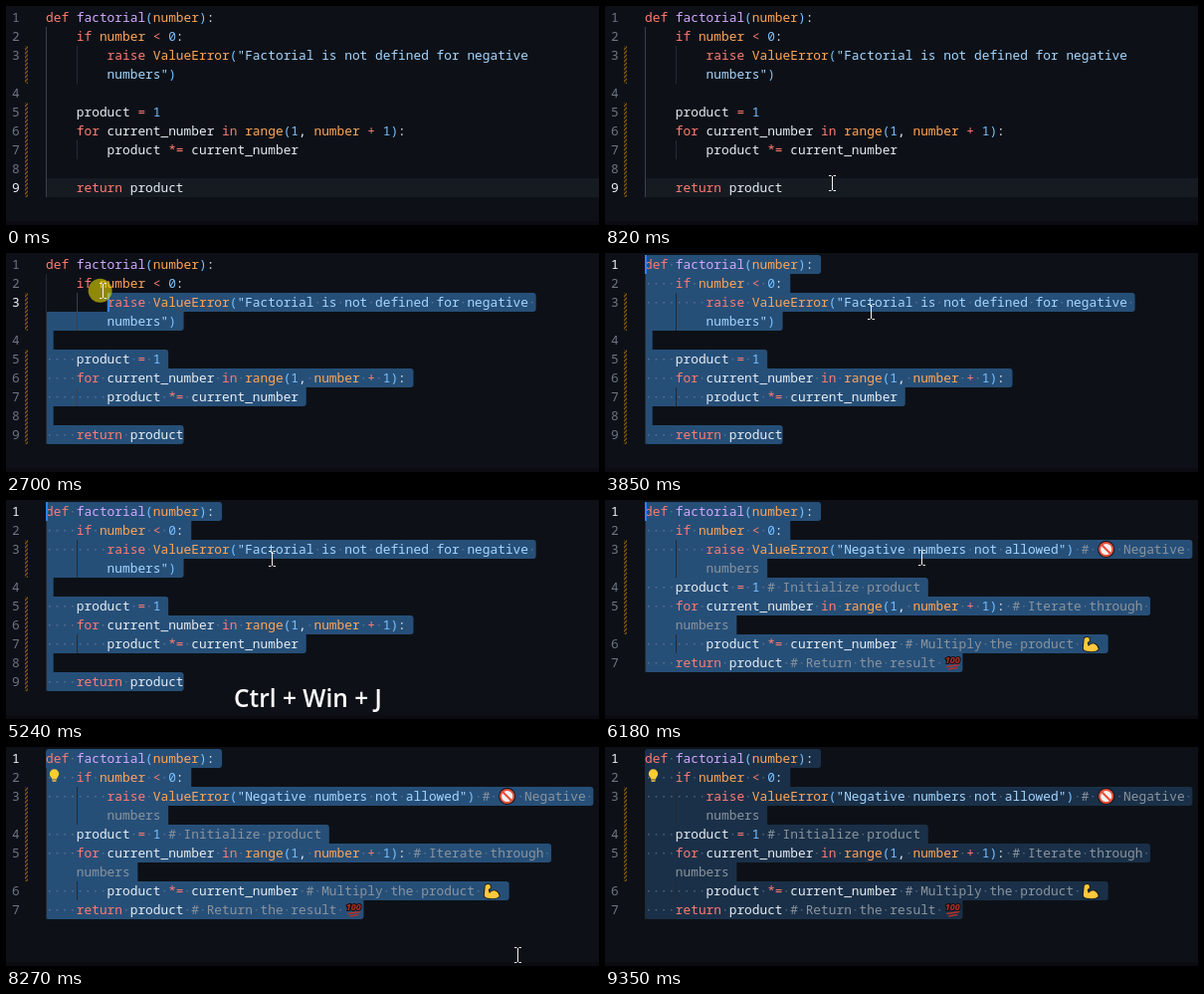
Write an HTML page with a canvas that moves like this. It is 596 px wide and 220 px high and loops after 9.42 s.

```html
<!DOCTYPE html>
<html>
<head>
<meta charset="utf-8">
<style>
  html, body { margin: 0; width: 596px; height: 220px; overflow: hidden; background: #0d1117; }
  canvas { display: block; }
</style>
</head>
<body>
<canvas id="stage" width="596" height="220"></canvas>
<script>
const g = document.getElementById('stage').getContext('2d');
const LOOP = 9420, LEFT = 40, TOP = 2, ROW = 19, CHAR = 7.698, EMOJI = 19.2;
const EDIT = 5980, PRESS = 2020, RELEASE = 2840, BLUR = 9350;

// Each row is [line number, text]; wrapped rows have no number.
const before = {
  rows: [
    [1, 'def factorial(number):'],
    [2, '    if number < 0:'],
    [3, '        raise ValueError("Factorial is not defined for negative '],
    [0, '        numbers")'],
    [4, ''],
    [5, '    product = 1'],
    [6, '    for current_number in range(1, number + 1):'],
    [7, '        product *= current_number'],
    [8, ''],
    [9, '    return product']
  ],
  changed: [[2, 4], [5, 10]]
};
const after = {
  rows: [
    [1, 'def factorial(number):'],
    [2, '    if number < 0:'],
    [3, '        raise ValueError("Negative numbers not allowed") # 🚫 Negative '],
    [0, '        numbers'],
    [4, '    product = 1 # Initialize product'],
    [5, '    for current_number in range(1, number + 1): # Iterate through '],
    [0, '    numbers'],
    [6, '        product *= current_number # Multiply the product 💪'],
    [7, '    return product # Return the result 💯']
  ],
  changed: [[2, 7]]
};

const TOKEN = /#.*|numbers"|"[^"]*"?|\w+|[<=*+]+|./gu;
const styles = [
  [/^(#|numbers$)/, '#8b949e'],
  [/"/, '#a5d6ff'],
  [/^(def|if|raise|for|in|return|[<=*+]+)$/, '#ff7b72'],
  [/^factorial$/, '#d2a8ff'],
  [/^(number|ValueError|range)$/, '#ffa657'],
  [/^(\d+|[()])$/, '#79c0ff']
];
const colorOf = token => (styles.find(([re]) => re.test(token)) || [0, '#e6edf3'])[1];

// Mouse keys: time, x, y
const path = [
  [320, 375, 240], [330, 375, 206], [540, 285, 190], [820, 228, 178], [1950, 228, 178],
  [2020, 186, 183], [2080, 186, 179], [2150, 185, 156], [2700, 97, 38], [2840, 46, -8],
  [2910, 46, -30], [3240, 170, -30], [3250, 185, 6], [3320, 245, 45], [3390, 267, 59],
  [5840, 267, 59], [6180, 318, 58], [6740, 420, 85], [7230, 535, 140], [7500, 535, 140],
  [8270, 514, 209], [8480, 508, 218], [8550, 508, 240]
];

function mouseAt(t) {
  const i = path.findIndex(key => key[0] > t);
  if (i < 1) return path.at(i).slice(1);
  const [a, b] = [path[i - 1], path[i]], k = (t - a[0]) / (b[0] - a[0]);
  return [a[1] + (b[1] - a[1]) * k, a[2] + (b[2] - a[2]) * k];
}

const rowY = r => TOP + r * ROW;
const advance = ch => ch.length > 1 ? EMOJI : CHAR;
const widthOf = text => [...text].reduce((sum, ch) => sum + advance(ch), 0);
const indentOf = text => text.search(/\S|$/);

function fill(color, x, y, w, h) {
  g.fillStyle = color;
  g.fillRect(x, y, w, h);
}

function shape(d, x, y, color, outline) {
  const p = new Path2D(d);
  g.save();
  g.translate(x, y);
  if (outline) { g.strokeStyle = outline; g.lineWidth = 1.6; g.stroke(p); }
  g.fillStyle = color;
  g.fill(p);
  g.restore();
}

function disc(x, y, r, color) {
  g.fillStyle = color;
  g.beginPath();
  g.arc(x, y, r, 0, 7);
  g.fill();
}

function line(color, width, ...pts) {
  g.strokeStyle = color;
  g.lineWidth = width;
  g.beginPath();
  for (let i = 0; i < pts.length; i += 4) {
    g.moveTo(pts[i], pts[i + 1]);
    g.lineTo(pts[i + 2], pts[i + 3]);
  }
  g.stroke();
}

const emoji = {
  '🚫'(x, y) {
    disc(x + 9.5, y + 9.5, 8.5, '#15100f');
    disc(x + 9.5, y + 9.5, 7.6, '#e8503f');
    disc(x + 9.5, y + 9.5, 5.6, '#f4f1ee');
    line('#e8503f', 2.2, x + 5, y + 5, x + 14, y + 14);
  },
  '💪'(x, y) {
    shape('M3 3Q6 1 8 3L8 6L6 7L7 11Q10 7 14 9Q17 11 17 14Q14 17 8 16Q2 16 2 13Z',
      x, y + 1, '#ffc83d', '#15100f');
  },
  '💯'(x, y) {
    g.font = 'italic bold 9px "Open Sans", sans-serif';
    g.strokeStyle = '#170c0c';
    g.lineWidth = 2;
    g.strokeText('100', x + 1.5, y + 10);
    g.fillStyle = '#b3322a';
    g.fillText('100', x + 1.5, y + 10);
    line('#b3322a', 1.3, x + 3, y + 13.5, x + 16, y + 11.5, x + 5, y + 16, x + 14, y + 14.5);
  }
};

function drawText(text, y) {
  let x = LEFT;
  for (const [token] of text.matchAll(TOKEN)) {
    const color = colorOf(token);
    for (const ch of token) {
      if (emoji[ch]) emoji[ch](x, y);
      else if (ch !== ' ') {
        g.font = '12.83px "Noto Sans Mono", monospace';
        g.fillStyle = color;
        g.fillText(ch, x, y + 14);
      }
      x += advance(ch);
    }
  }
}

function drawSelection(rows, head, color) {
  const spans = rows.map(([, text], r) => {
    if (r < head.row) return [0, 0];
    const endOfLine = r < rows.length - 1 && rows[r + 1][0];
    return [LEFT + (r === head.row ? head.col * CHAR : 0),
      LEFT + widthOf(text) + (endOfLine ? CHAR : 0)];
  });
  spans.forEach(([from, to], r) => {
    if (!to) return;
    const above = r ? spans[r - 1] : [0, 0], below = spans[r + 1] || [0, 0];
    const round = free => free ? 3 : 0;
    g.fillStyle = color;
    g.beginPath();
    g.roundRect(from, rowY(r), to - from, ROW, [
      round(!above[1]), round(to > above[1]), round(to > below[1]), round(!below[1])]);
    g.fill();
  });
}

function drawSpaces(rows, head) {
  rows.forEach(([num, text], r) => {
    if (r < head.row) return;
    const first = num ? (r === head.row ? head.col : 0) : indentOf(text);
    let x = LEFT;
    [...text].forEach((ch, i) => {
      if (ch === ' ' && i >= first) fill('rgba(139,148,158,.5)', x + 3, rowY(r) + 9, 1.5, 1.5);
      x += advance(ch);
    });
  });
}

function drawGutter({ rows, changed }, active) {
  g.font = '12.83px "Noto Sans Mono", monospace';
  rows.forEach(([num], r) => {
    if (!num) return;
    g.fillStyle = num === active ? '#f0f6fc' : '#6e7681';
    g.fillText(num, 6, rowY(r) + 14);
  });
  for (const [from, to] of changed) {
    g.save();
    g.beginPath();
    g.rect(19, rowY(from), 3, (to - from) * ROW);
    g.clip();
    for (let y = rowY(from); y < rowY(to) + 4; y += 4) line('#80590c', 1.3, 18, y + 1, 23, y - 4);
    g.restore();
  }
}

function drawGuides(rows, head) {
  rows.forEach(([, text], r) => {
    const levels = r ? Math.max(1, indentOf(text) / 4) : 0;
    for (let i = 0; i < levels; i++) {
      const active = head.row > 0 && i === (head.row === 2 || head.row === 3 ? 1 : 0);
      fill(active ? '#3a414a' : '#242a32', Math.round(LEFT + i * 4 * CHAR), rowY(r), 1, ROW);
    }
  });
}

function headAt(t, rows) {
  const last = rows.length - 1;
  if (t < PRESS) return { row: last, col: rows[last][1].length };
  if (t >= RELEASE) return { row: 0, col: 0 };
  const [x, y] = mouseAt(t - 30);
  const row = Math.max(0, Math.min(last, Math.floor((y - TOP) / ROW)));
  const col = Math.max(0, Math.min(rows[row][1].length, Math.round((x - LEFT) / CHAR)));
  return { row, col };
}

function drawWordMatches(rows) {
  rows.forEach(([, text], r) => {
    const at = text.indexOf('product');
    if (at < 0) return;
    const x = LEFT + at * CHAR;
    fill('rgba(110,118,129,.4)', x, rowY(r), 7 * CHAR, ROW);
    g.strokeStyle = 'rgba(110,118,129,.6)';
    g.lineWidth = 1;
    g.strokeRect(x + .5, rowY(r) + .5, 7 * CHAR - 1, ROW - 1);
  });
}

function drawBulb() {
  disc(48.5, 27, 4.7, '#ffcc33');
  fill('#ffcc33', 46, 29, 5, 3.5);
  fill('#c9a24a', 46.5, 33, 4, 2);
}

function drawMouse(t) {
  const [x, y] = mouseAt(t);
  if (t >= PRESS && t < 2910) disc(x - 2, y, 12, 'rgba(232,216,0,.6)');
  const cx = Math.round(x) + .5, cy = Math.round(y);
  line('#f4f4f4', 1, cx, cy - 7, cx, cy + 7,
    cx - 3.5, cy - 7.5, cx - 1, cy - 7.5, cx + 1, cy - 7.5, cx + 3.5, cy - 7.5,
    cx - 3.5, cy + 7.5, cx - 1, cy + 7.5, cx + 1, cy + 7.5, cx + 3.5, cy + 7.5);
}

function caretVisible(t) {
  if (t < PRESS || t >= BLUR) return false;
  if (t < RELEASE) return true;
  const phase = t < 5840 ? (t - RELEASE) / 500 : (t - 5840) / 484;
  return Math.floor(phase) % 2 === 0;
}

function draw(t) {
  const doc = t < EDIT ? before : after, { rows } = doc;
  const head = headAt(t, rows), selecting = t >= PRESS;
  const active = rows.slice(0, head.row + 1).findLast(([num]) => num)[0];

  fill('#0d1117', 0, 0, 596, 220);
  fill('#0c0b11', 0, 216, 596, 4);
  if (selecting) drawSelection(rows, head, t < BLUR ? '#264f78' : '#1a3048');
  else fill('#161b22', LEFT, rowY(head.row), 556, ROW);
  drawGuides(rows, head);
  if (selecting && t < 2250) drawWordMatches(rows);
  if (selecting) drawSpaces(rows, head);
  drawGutter(doc, active);
  rows.forEach(([, text], r) => drawText(text, rowY(r)));
  if (t >= 7000) drawBulb();
  if (caretVisible(t)) fill('#2f81f7', Math.round(LEFT + head.col * CHAR), rowY(head.row), 2, ROW);
  if (t >= 5240 && t < 5380) {
    g.font = '600 24.5px "Open Sans", sans-serif';
    g.fillStyle = '#fff';
    g.fillText('Ctrl + Win + J', 229, 208);
  }
  drawMouse(t);
}

const start = performance.now();
(function tick() {
  draw((performance.now() - start) % LOOP);
  requestAnimationFrame(tick);
})();
</script>
</body>
</html>
```
